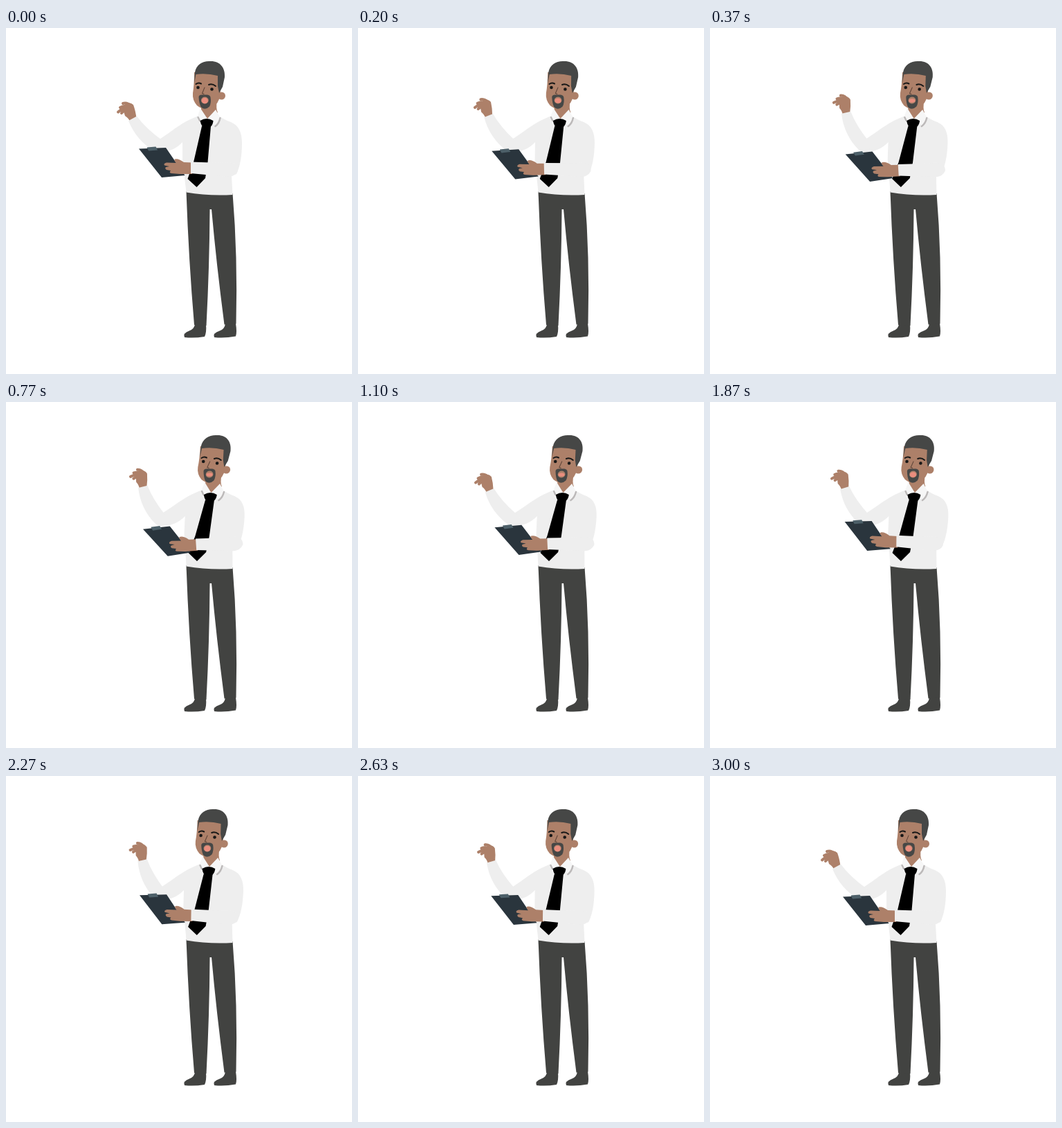
Recreate the animation shown at these times as an HTML page. Size 500 by 500 pixels, loop 3.03 s.

```html
<!DOCTYPE html>
<html lang="en">
<head>
<meta charset="utf-8">
<title>Presenter with clipboard</title>
<style>
  html, body { margin: 0; width: 100%; height: 100%; overflow: hidden; background: #fff; }
  svg { display: block; width: 100%; height: 100%; }
  .skin { fill: #ad8069; }
  .hair { fill: #464746; }
  .shirt { fill: #eee; }
  .dark { fill: #424341; }
  .line { fill: none; stroke-linecap: round; stroke-linejoin: round; }
</style>
</head>
<body>
<svg viewBox="0 0 500 500">
  <g class="dark">
    <path d="M273 428H289Q290 440 287 446Q272 448.500 258 447Q255 441 265 437.500Q272 435 273 428Z"/>
    <path d="M317 427H332Q334 440 332 445.500Q316 448.500 301 447Q298 441 309 437.500Q316 435 317 427Z"/>
    <path d="M260.500 236L327.500 239Q335 330 332.500 427.500L315.500 428.500Q304 340 297 262L294.500 262Q294 345 289.500 430L272 429Q264 335 260.500 236Z"/>
  </g>

  <g id="body">
    <path class="shirt" d="M281 126L304 125Q316 133 325 136C337 141 341 152 341 166C341 186 338 201 333 211L326 214L327.500 241Q293 243 260.500 237.500L255 190V165Q242 179 223 179Q212 170 223 160C238 151 254 135 281 126Z"/>
    <path class="skin" d="M282 108L305 103Q303 117 306 122L291 134L282 127Z"/>
    <path fill="#f6f6f6" d="M281 116L291 131L303 118L311 132L303 142L292 132L280 139L276 130Z"/>
    <path class="line" stroke="#bcb9b9" stroke-width="2.500" d="M309.500 130Q308 138 302.500 142M277.500 129L280 134"/>
    <path d="M283 142H296L291.500 194L288 217L275.500 230L262.500 218L271 194Z"/>
    <path d="M280.500 134Q290 128 299.500 134Q299 140 295.500 143H284Q281 138 280.500 134Z"/>

    <circle class="skin" cx="311.500" cy="98" r="5.500"/>
    <path class="skin" d="M272 64L309 66L310 95Q308 110 297 115Q286 120 276 112Q269 104 270 94Q272 82 272 64Z"/>
    <path class="hair" d="M272 80L273 64C275 52 285 47 296 48C310 48 317 58 316 71L313 85L308 94L306 84V69Q290 65 274.500 67Z"/>
    <path class="hair" d="M278.500 100Q278.500 96.500 283 96.500H291Q295 97 295.500 100Q297 108 294 113.500Q288 119.500 282 114.500Q279 109 278.500 100Z"/>
    <ellipse class="skin" cx="287.300" cy="104.500" rx="5.400" ry="5"/>
    <ellipse id="lips" cx="287.300" cy="105" rx="4.600" fill="#ea8d7e"/>
    <g fill="#171717"><circle cx="277.500" cy="86" r="2.300"/><circle cx="297.500" cy="88.500" r="2.300"/></g>
    <path class="line" stroke="#171717" stroke-width="2" d="M274.500 81Q278 78.500 282 80.500M293 82Q298 80 303 84"/>
    <path class="line" stroke="#5d4439" stroke-width="1" d="M287 86L283.500 94.500L286 95.500"/>
  </g>

  <g id="waver">
    <path class="line" stroke="#ad8069" stroke-width="4" d="M181 113Q175 107 169 109M178 114Q171 111 165 115M178 117Q170 114 162 121.500M178 121Q171 117 167 123"/>
    <path class="skin" d="M170 112Q178 105 184 111Q187 119 188.500 130L179 135Q177 130 172 127Q169 119 170 112Z"/>
    <path class="shirt" d="M177 134L189 127.500Q202 145 224 161Q234 167 227 177Q221 181 215 178C197 168 184 152 177 134Z"/>
  </g>

  <g id="holder">
    <path fill="#2a353d" d="M192 174.500L231 173L258.500 213L225 216Z"/>
    <path fill="#4d6069" d="M203.500 172.500L216.500 171.500L219 176.500L206 177.500Z"/>
    <path class="skin" d="M269 194.500L257 194Q249 188 244 189.500Q242 191 246 195L232 194.500Q227 196 229 198.500L236 200L231 201Q229 203 232 205L238 206Q235 209 239 210L251 211H269Z"/>
    <path class="shirt" d="M267 193.500L312 195Q336 192 334.500 207Q330 215 321 215L267 210Z"/>
  </g>
</svg>

<script>
const LOOP = 3030, WAIST = 240, ELBOW = 168;
const $ = id => document.getElementById(id);
const body = $("body"), waver = $("waver"), holder = $("holder"), lips = $("lips");

const ease = (t, from, to) => {
  const u = Math.min(1, Math.max(0, (t - from) / (to - from)));
  return (1 - Math.cos(Math.PI * u)) / 2;
};

// Rises from a to b, holds until c and falls back by d.
const swell = (t, a, b, c, d) => ease(t, a, b) - ease(t, c, d);

function draw(t) {
  const lean = .05 * swell(t, 0, 600, 1600, 3000);
  const wave = 16.5 * swell(t, 0, 450, 2450, 3000) - 13.3 * swell(t, 650, 1250, 1250, 2300);
  const slide = 8 * swell(t, 0, 600, 650, 2550);
  const drop = 4 * swell(t, 0, 500, 650, 1900) - swell(t, 1400, 2200, 2300, 3000);

  body.setAttribute("transform", `matrix(1 0 ${-lean} 1 ${lean * WAIST} 0)`);
  waver.setAttribute("transform", `translate(${lean * (WAIST - ELBOW)} ${wave * .05}) rotate(${wave} 223 ${ELBOW})`);
  holder.setAttribute("transform", `translate(${slide} 0) rotate(${-drop} 325 208)`);
  lips.setAttribute("ry", 4.2 - 1.8 * swell(t, 0, 500, 800, 2300));
}

const start = performance.now();
function tick() {
  draw((performance.now() - start) % LOOP);
  requestAnimationFrame(tick);
}
tick();
</script>
</body>
</html>
```
